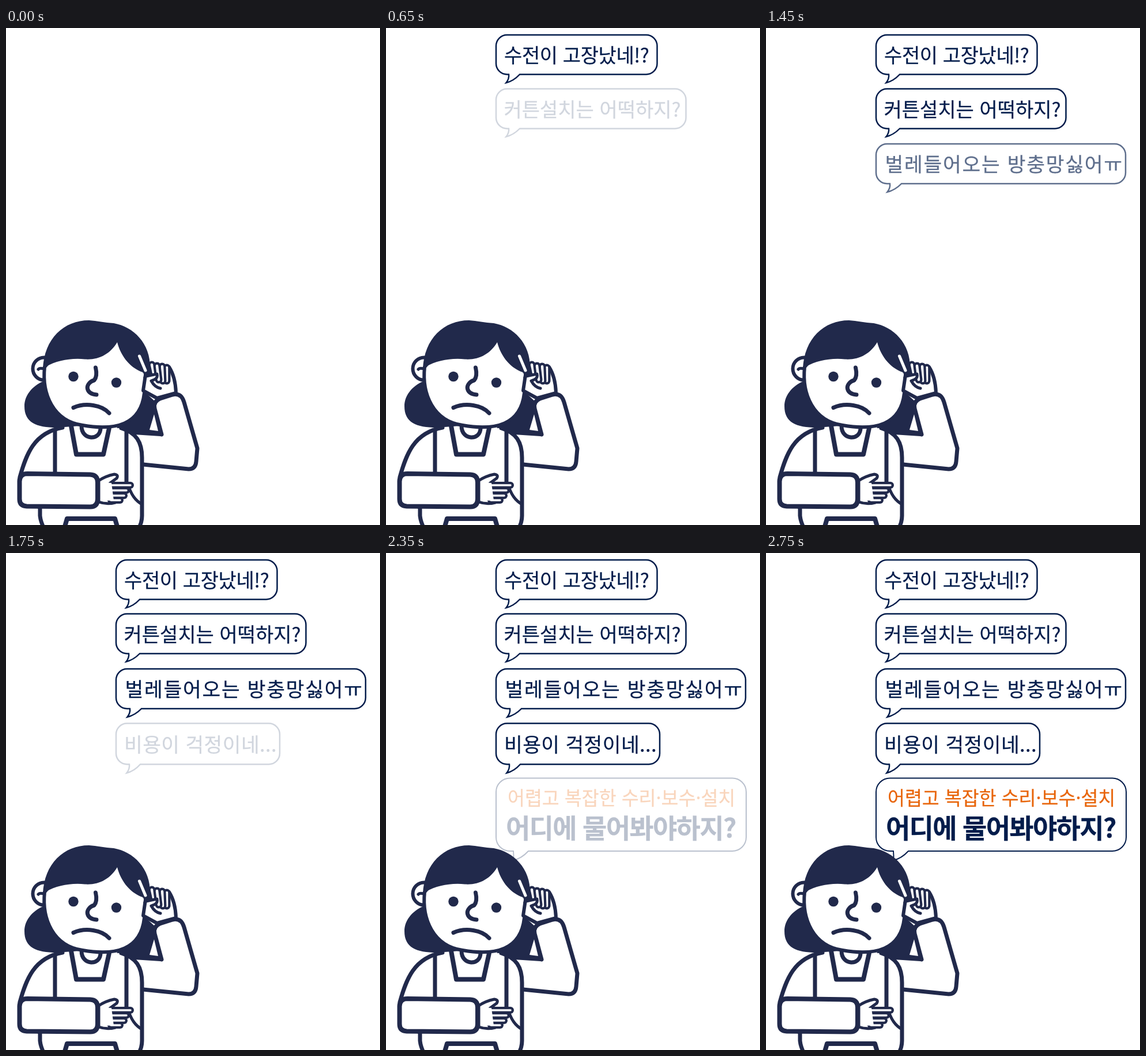
These frames come from a looping animation (649 px wide and 862 px high, 4.55 s). An HTML page:

```html
<!DOCTYPE html>
<html lang="ko">
<head>
<meta charset="utf-8">
<style>
html, body { margin: 0; width: 100%; height: 100%; overflow: hidden; background: #fff; }
svg { display: block; width: 649px; height: 862px; }
text { font-family: "Noto Sans CJK KR", "Noto Sans KR", "Noto Sans CJK", sans-serif; white-space: pre;
  stroke-width: .25; stroke-linejoin: round; }
.bubble { opacity: 0; }
#girl { fill: #fff; stroke: #21294b; stroke-width: 7; stroke-linecap: round; stroke-linejoin: round; }
#girl .dark { fill: #21294b; stroke: none; }
#girl .line { fill: none; }
#girl .white { stroke: none; }
</style>
</head>
<body>
<svg viewBox="0 0 649 862">
  <g id="bubbles"></g>
  <g id="girl">
    <!-- raised arm -->
    <path d="M238 757L317 765Q329 765 330 752L332 729L309 649Q304 632 289 636L267 643Q255 648 258 660L270 705"/>
    <!-- ear and lower hair -->
    <circle cx="66" cy="591" r="19.5" stroke-width="6"/>
    <path class="line" d="M56 592Q58 589 66 591" stroke-width="5"/>
    <path class="dark" d="M66 612C43 622 32 639 32 656C32 684 52 693 88 693L130 690L80 630Z"/>
    <path class="dark" d="M236 630L247 637L259 648Q254 655 258 663L272 704Q272 708 268 708L222 705L190 697Z"/>
    <path class="white" d="M257 670L249 697L264 699Z"/>
    <!-- body -->
    <path d="M98 693C48 702 35 740 24 779L59 833V846Q60 856 66 868H230Q236 858 236 846V745C236 718 226 702 200 694"/>
    <path class="line" d="M85 697V772M209 697V788"/>
    <path class="line" d="M212 792Q219 817 236 826" stroke-width="5"/>
    <path class="line" d="M113 690L122 739.500H169L179 694" stroke-width="8"/>
    <path class="line" d="M131 690C131 716 164 716 164 694"/>
    <path class="line" d="M101 868L106 851H189L194 868" stroke-width="8"/>
    <!-- head -->
    <path d="M67 588C62 635 82 682 133 689C190 699 234 688 240 633L243 592L190 535L90 560Z" stroke-width="6"/>
    <path class="dark" d="M64 592C66 538 101 507 144 507C158 508 171 511 187 512C221 518 251 547 250 590L246 612L238 607Q241 600 237 597C212 588 198 565 193 545C181 565 162 576 137 574.500C112 572 88 577 70 587Z"/>
    <circle class="dark" cx="117" cy="604.500" r="8.700"/>
    <circle class="dark" cx="191.500" cy="615" r="8.700"/>
    <path class="line" d="M155.500 589Q159 604 153 611C145 613 140 620 141.500 626Q144 635 157 636"/>
    <path class="line" d="M117 658.500C138 649 167 654 179 668"/>
    <!-- raised hand -->
    <path d="M242 602L238 629L262 642L295 633Q294 605 283 588L262 594Z" stroke-width="6"/>
    <g id="upper"></g>
    <path d="M243 604L262 600Q264 607 257 610L252 612Q258 623 268 625" stroke-width="5"/>
    <path class="line" d="M231.500 569L242 594" stroke="#fff" stroke-width="5"/>
    <!-- folded forearm -->
    <path d="M161 785Q173 777 188 774Q196 775 192 781L181 789L190 823Q175 827 161 822Z" stroke-width="5"/>
    <g id="lower"></g>
    <path class="white" d="M164 788L183 789L187 820L164 819Z"/>
    <path d="M37 773L146 774.500Q159 775 159 788V817Q159 830.500 146 830.500L36 829.500Q23.500 829 23.500 817V786Q24 773 37 773Z" stroke-width="8"/>
  </g>
</svg>
<script>
const NS = "http://www.w3.org/2000/svg";
const LOOP = 4550, FADE = 550, STEPS = 11;
const NAVY = "#021c4b", ORANGE = "#e8650a";

function add(parent, tag, attrs, content) {
  const el = document.createElementNS(NS, tag);
  for (const key in attrs) el.setAttribute(key, attrs[key]);
  if (content) el.textContent = content;
  parent.append(el);
  return el;
}

// Rounded box with a tail: [base left, base right, tip x, tip y]
function bubblePath(top, right, bottom, r, [a, b, tx, ty]) {
  const left = 191;
  const corner = (x, y) => `A${r} ${r} 0 0 1 ${x} ${y}`;
  return `M${left + r} ${top}H${right - r}${corner(right, top + r)}` +
    `V${bottom - r}${corner(right - r, bottom)}H${b}` +
    `Q${(b + tx) / 2 + 1} ${ty - 3} ${tx} ${ty}Q${a + 1} ${ty - 7} ${a} ${bottom}` +
    `H${left + r}${corner(left, bottom - r)}V${top + r}${corner(left + r, top)}Z`;
}

const bubbles = [
  { start: 50, box: [12, 470.5, 80.5, 19], tail: [213, 232, 208.5, 95],
    lines: [{ text: "수전이 고장났네!?", x: 205, y: 60, size: 34, gap: -.4 }] },
  { start: 600, box: [105.5, 520.5, 174.5, 19], tail: [213, 232, 208.5, 188.5],
    lines: [{ text: "커튼설치는 어떡하지?", x: 204.5, y: 154, size: 34 }] },
  { start: 1150, box: [201, 624, 270, 19], tail: [215, 235, 210.5, 284.5],
    lines: [{ text: "벌레들어오는 방충망싫어ㅠ", x: 206.5, y: 249, size: 34.5, gap: 1.75 }] },
  { start: 1700, box: [295.5, 475, 366.5, 19], tail: [214, 233, 209.5, 381.5],
    lines: [{ text: "비용이 걱정이네...", x: 205, y: 344.5, size: 34.5, gap: .4 }] },
  { start: 2250, box: [390.5, 625, 517, 24], tail: [221, 247, 221, 533], width: 2,
    lines: [
      { text: "어렵고 복잡한 수리·보수·설치", x: 211, y: 437, size: 32.6, gap: -.05, color: ORANGE },
      { text: "어디에 물어봐야하지?", x: 208, y: 494, size: 46, gap: -1.7, weight: 700 }
    ] }
];

for (const { start, box, tail, width = 2.5, lines } of bubbles) {
  const g = add(document.getElementById("bubbles"), "g", { class: "bubble" });
  add(g, "path", { d: bubblePath(...box, tail), fill: "#fff", stroke: NAVY, "stroke-width": width });
  for (const { text, x, y, size, gap = 0, weight = 400, color = NAVY } of lines) {
    add(g, "text", { x, y, "font-size": size, "letter-spacing": gap, "font-weight": weight,
      fill: color, stroke: color }, text);
  }
  const from = start - 1;
  g.animate([
    { opacity: 0, offset: 0 },
    { opacity: 0, offset: from / LOOP, easing: `steps(${STEPS}, start)` },
    { opacity: 1, offset: (from + FADE) / LOOP },
    { opacity: 1, offset: 1 }
  ], { duration: LOOP, iterations: Infinity });
}

// Each finger is a white stroke inside a wider dark one
function fingers(id, outer, inner, list) {
  const g = document.getElementById(id);
  for (const [x1, y1, x2, y2] of list) {
    const d = `M${x1} ${y1}L${x2} ${y2}`;
    add(g, "path", { d, "stroke-width": outer });
    add(g, "path", { d, "stroke-width": inner, stroke: "#fff" });
  }
}
fingers("upper", 13, 4.5, [[253, 584, 257, 602], [279, 589, 279, 612], [271, 587, 272, 612], [262, 586, 265, 610]]);
fingers("lower", 12, 3.5, [[182, 819, 198, 819], [182, 811, 205, 811], [182, 802, 209, 802], [182, 793, 216, 793]]);
</script>
</body>
</html>
```
